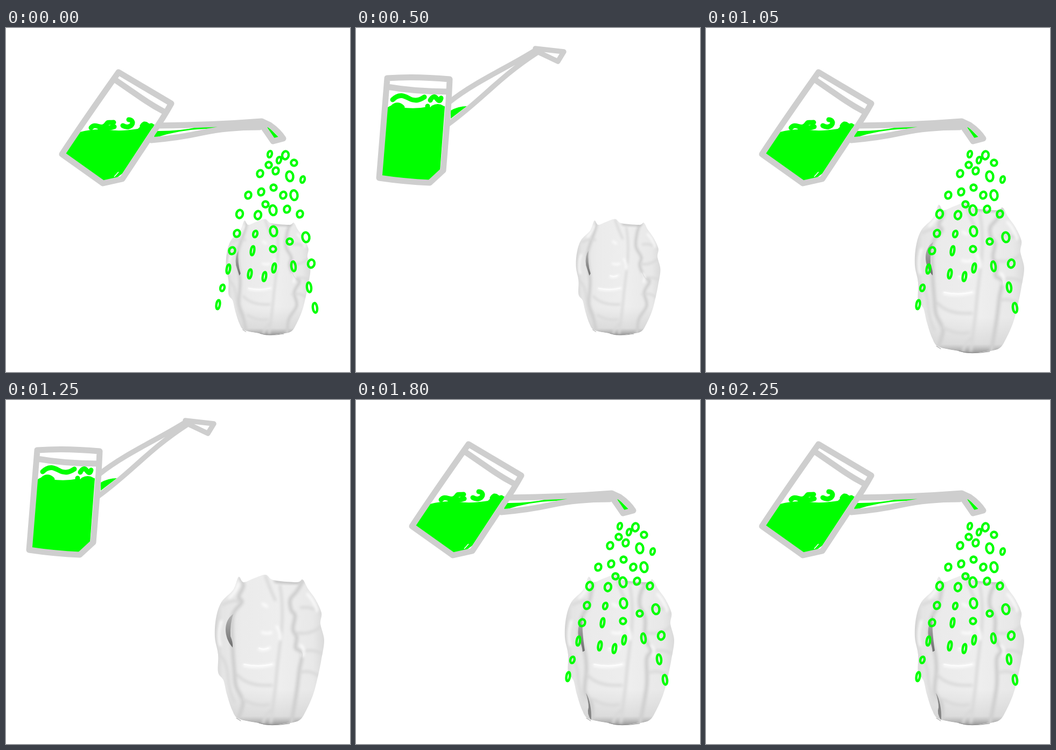
An HTML page that plays this animation: 639x638 px, repeating every 2.75 s.

```html
<!DOCTYPE html>
<html lang="en">
<head>
<meta charset="utf-8">
<title>Watering a vase</title>
<style>
  html, body { margin: 0; height: 100%; overflow: hidden; background: #fff; }
  svg { display: block; width: 100vw; height: 100vh; }
  .line { fill: none; stroke-linecap: round; stroke-linejoin: round; }
  .can { stroke: #cecece; stroke-width: 11; }
  .spout { stroke-width: 9.5; }
  .water { fill: #0f0; }
  .ripple { stroke: #0f0; stroke-width: 9; }
  .drop { fill: none; stroke: #0f0; stroke-width: 4.4; }
  .soft { filter: url(#blur); }
  .shade { stroke: #cfcfcf; stroke-width: 7; }
  .fold { stroke: #d9d9d9; stroke-width: 5; }
  .edge { stroke: #d2d2d2; stroke-width: 1.2; }
  .glint { stroke: #fff; stroke-width: 4; }
</style>
</head>
<body>
<svg viewBox="0 0 639 638">
  <defs>
    <filter id="blur" x="-30%" y="-30%" width="160%" height="160%"><feGaussianBlur stdDeviation="2.6"/></filter>
    <linearGradient id="body">
      <stop offset="0" stop-color="#d2d2d2"/>
      <stop offset=".07" stop-color="#e4e4e4"/>
      <stop offset=".25" stop-color="#ebebeb"/>
      <stop offset=".6" stop-color="#eeeeee"/>
      <stop offset=".9" stop-color="#e8e8e8"/>
      <stop offset="1" stop-color="#dadada"/>
    </linearGradient>
    <linearGradient id="base" x2="0" y2="1">
      <stop offset=".76" stop-color="#999" stop-opacity="0"/>
      <stop offset=".94" stop-color="#999" stop-opacity=".2"/>
      <stop offset="1" stop-color="#777" stop-opacity=".75"/>
    </linearGradient>
    <linearGradient id="inside" x2="0" y2="1">
      <stop offset="0" stop-color="#b5b5b5"/>
      <stop offset="1" stop-color="#6e6e6e"/>
    </linearGradient>
    <clipPath id="vaseClip"><path class="outline"/></clipPath>
  </defs>

  <g id="vase">
    <path class="outline" fill="url(#body)"/>
    <g clip-path="url(#vaseClip)">
      <path class="outline" fill="url(#base)"/>
      <g class="line soft">
        <path class="shade seam"/>
        <path class="fold" d="M482 326Q490 350 500 371 M509 345Q517 390 510 445T502 515 492 598
          M402 380Q425 368 434 375 M392 470Q410 480 412 510T424 560 M430 510Q450 532 493 529
          M548 385Q570 382 585 396 M543 432Q565 436 586 420 M553 466Q572 461 590 472 M547 505Q565 500 581 512
          M440 555Q465 570 488 565 M478 598Q482 580 496 574"/>
        <path class="glint" d="M442 492Q468 498 496 490 M470 462Q480 466 490 459 M477 378l8 5 M476 431q10 4 17 0
          M503 420q8 10 6 24 M432 340Q428 355 415 367 M400 410Q392 435 398 455 M560 360Q574 375 578 392 M548 455q8 8 3 20"/>
      </g>
      <path class="line glint" stroke-width="2" opacity=".8" style="stroke-width:2" d="M442 490Q468 496 494 490 M470 460q9 4 17 0"/>
      <path d="M496 333Q520 337 549 334L543 341Q518 341 500 339Z" fill="#bdbdbd" class="soft"/>
      <path class="line edge seam"/>
      <path id="gap" fill="url(#inside)"/>
      <path id="slit" fill="#858585" d="M427 543Q438 562 437 594Q428 582 432 570Q432 558 427 543Z"/>
    </g>
    <path class="line" stroke="#8c8c8c" d="M428 590L436 595 M470 599Q490 606 527 600"/>
  </g>

  <g id="upright">
    <path class="water" d="M58 148Q66 140 82 147Q110 151 133 146Q150 149 165 145L156 265 135 283 47 275Z
      M176 153Q190 145 206 145L176 168Z"/>
    <path class="line ripple" d="M68 133C84 117 96 131 104 133S118 134 127 128 M138 134Q144 123 150 131T158 130
      M68 147q9-8 18 0 M133 145v1 M143 148q9-5 17 0"/>
    <path class="line can" d="M58 93Q110 89 174 95Q172 145 168 190L162 264 137 287Q90 285 43 278Q47 230 51 180Z M58 109Q110 118 170 118"/>
    <path class="line can spout" d="M174 137C220 100 285 72 335 40 M172 178C235 132 265 92 336 46
      M333 38L386 44 375 62 337 44"/>
  </g>

  <g id="pouring">
    <path class="water" d="M137 193Q165 186 190 189T245 187Q256 174 276 179L216 270 204 279 180 284 109 233Z
      M276 191Q320 192 360 183T470 178Q420 185 370 187T275 204Z M482 178L507 203 497 207Z"/>
    <path class="line ripple" d="M158 185C166 175 175 189 184 181S183 176 200 175 M174 185Q190 187 201 183
      M217 181C233 190 242 171 228 170 M253 182Q257 175 262 180T270 181"/>
    <path d="M201 276L209 267" stroke="#fff" stroke-width="1.5"/>
    <path class="line can" d="M209 82L307 140Q292 167 275 191L216 280 180 288 104 234Q145 172 209 82Z M204 97Q230 115 252 130T295 156"/>
    <path class="line can" d="M283 181Q385 180 475 173L490 180Q505 190 515 205L496 210Q486 195 476 181 M270 208Q320 204 365 194T471 184"/>
    <g id="drops"></g>
  </g>
</svg>
<script>
  const LOOP = 2750;
  const $ = selector => document.querySelector(selector);
  const setPath = (selector, d) =>
    document.querySelectorAll(selector).forEach(node => node.setAttribute('d', d));

  // Catmull-Rom curve through a list of "x,y" points.
  function curve(text, closed = false) {
    const p = text.split(' ').map(pair => pair.split(',').map(Number));
    const n = p.length;
    const at = i => closed ? p[(i + n) % n] : p[Math.max(0, Math.min(n - 1, i))];
    let d = 'M' + p[0];
    for (let i = 0; i < n - (closed ? 0 : 1); i++) {
      const [a, b, c, e] = [at(i - 1), at(i), at(i + 1), at(i + 2)];
      const out = b.map((v, k) => v + (c[k] - a[k]) / 6);
      const into = c.map((v, k) => v - (e[k] - b[k]) / 6);
      d += `C${out} ${into} ${c}`;
    }
    return d + (closed ? 'Z' : '');
  }

  setPath('.outline', curve('432,328 441,338 460,331 482,324 497,334 540,338 551,333 561,350 575,370 586,395 ' +
    '584,415 591,445 586,480 580,510 571,545 558,575 545,594 520,600 488,603 468,599 432,591 420,575 ' +
    '410,545 404,520 394,505 394,472 388,440 390,405 400,375 422,352', true));

  // Drops grouped by half width, half height and tilt.
  const dropShapes = [
    [5.5, 5.5, 20, '535,250 488,254 497,296 482,327 496,410 527,396'],
    [5.5, 6.5, 20, '501,265 474,304 450,310 515,310 522,336 429,381 420,413 546,345 472,270'],
    [6, 7.5, 12, '519,236 434,345 468,347 567,437'],
    [3.8, 6, 15, '490,234 507,245 551,281 463,382 402,482'],
    [6.5, 9, -8, '527,275 535,310 496,338 497,377 557,388'],
    [3.2, 8.5, 9, '458,413 413,447 453,456 480,461 498,445 394,513'],
    [4, 9, -7, '534,442 563,481 574,519']
  ];
  $('#drops').innerHTML = dropShapes.map(([rx, ry, tilt, places]) => places.split(' ').map(place =>
    `<ellipse class="drop" rx="${rx}" ry="${ry}" transform="translate(${place}) rotate(${tilt})"/>`
  ).join('')).join('');

  const seams = {
    narrow: curve('438,328 435,347 418,396 416,422 422,474 419,526 429,558 438,601') +
      curve('545,328 535,357 532,390 545,416 541,435 553,464 565,474 552,500 558,532 539,565 535,601'),
    wide: curve('436,330 441,345 432,365 438,375 421,400 421,460 424,500 427,530 440,560 432,590') +
      curve('552,335 540,355 528,370 530,390 537,400 533,425 540,440 538,460 550,470 545,500 540,540 530,600'),
    split: curve('440,330 438,350 432,380 421,400 415,435 425,468 428,500 425,540 438,565 438,595') +
      curve('545,331 530,355 527,380 537,405 537,440 548,465 540,480 540,530 528,598')
  };
  const gaps = {
    thin: 'M418 400Q409 412 412 435L420 460 423 455Q415 430 418 400Z',
    open: 'M422 397C403 410 404 440 421 459Q422 450 417 438Q416 415 422 397Z',
    torn: 'M421 400Q408 425 415 446Q420 455 421 467L425 465Q419 425 421 400Z'
  };
  const poses = [
    { until: 500, pouring: true, small: true, seam: 'narrow', gap: 'thin' },
    { until: 750, small: true, seam: 'narrow', gap: 'thin' },
    { until: 1250, pouring: true, seam: 'wide', gap: 'open' },
    { until: 1500, seam: 'wide', gap: 'open' },
    { until: 2000, pouring: true, seam: 'split', gap: 'torn', slit: true },
    { until: 2250, seam: 'split', gap: 'torn', slit: true },
    { until: LOOP, pouring: true, seam: 'split', gap: 'torn', slit: true }
  ];

  const show = (selector, visible) => { $(selector).style.display = visible ? '' : 'none'; };
  let current;

  function draw(now) {
    const pose = poses.find(p => now % LOOP < p.until);
    if (pose !== current) {
      current = pose;
      show('#pouring', pose.pouring);
      show('#upright', !pose.pouring);
      show('#slit', pose.slit);
      setPath('.seam', seams[pose.seam]);
      setPath('#gap', gaps[pose.gap]);
      $('#vase').setAttribute('transform', pose.small ? 'translate(109.2 104.1) scale(.772)' : '');
    }
    requestAnimationFrame(draw);
  }
  draw(0);
</script>
</body>
</html>
```
